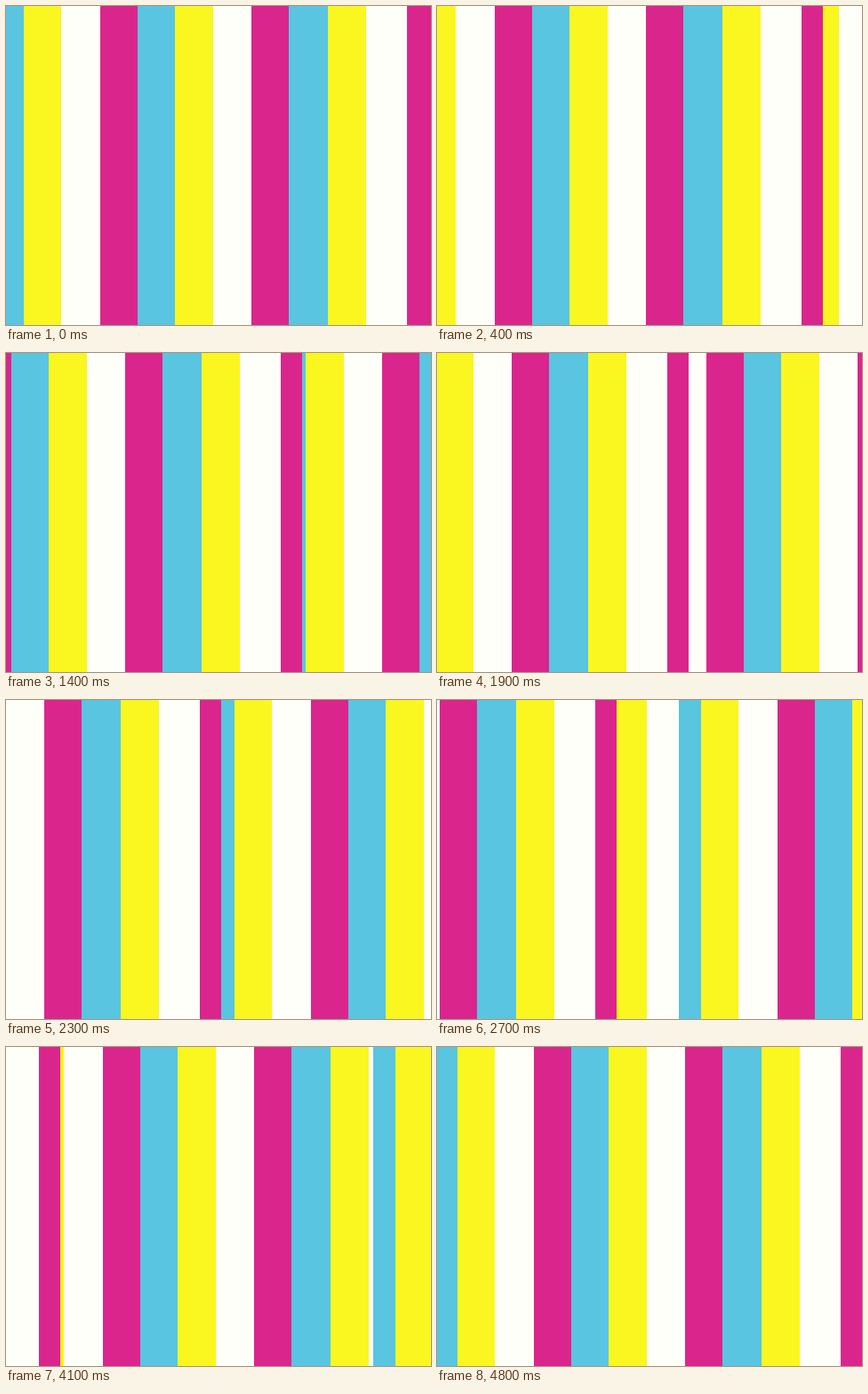
An HTML page with a canvas that plays this animation: 478x358 px, repeating every 5 s.

```html
<!DOCTYPE html>
<html lang="en">
<head>
<meta charset="utf-8">
<title>Sliding stripes</title>
<style>
  html, body { margin: 0; width: 100%; height: 100%; overflow: hidden; }
  canvas { display: block; }
</style>
</head>
<body>
<canvas id="stage" width="478" height="358"></canvas>
<script>
const W = 478, H = 358;
const ctx = document.getElementById('stage').getContext('2d');
const colors = ['#59c5e0', '#faf61f', '#fffffa', '#da268c'];
const edges = [0, 23, 65, 109, 151, 193, 236, 279, 321, 365, 408, 454, W];

// One sheet of stripes; lead widens its first stripe to the left
function sheet(x, lead = 0) {
  x = Math.round(x);
  for (let i = 0; i < 12; i++) {
    const left = edges[i] - (i ? 0 : lead);
    ctx.fillStyle = colors[i % 4];
    ctx.fillRect(x + left, 0, edges[i + 1] - left, H);
  }
}

// Two sheets part in opposite directions over a resting one
function draw(now) {
  const step = Math.min(48, Math.floor(now % 5000 / 100));
  sheet(0);
  sheet(3.8 + 10.02 * step, 2);
  sheet(-3.5 - 10.09 * step);
}

const start = performance.now();
function tick() {
  draw(performance.now() - start);
  requestAnimationFrame(tick);
}
tick();
</script>
</body>
</html>
```
